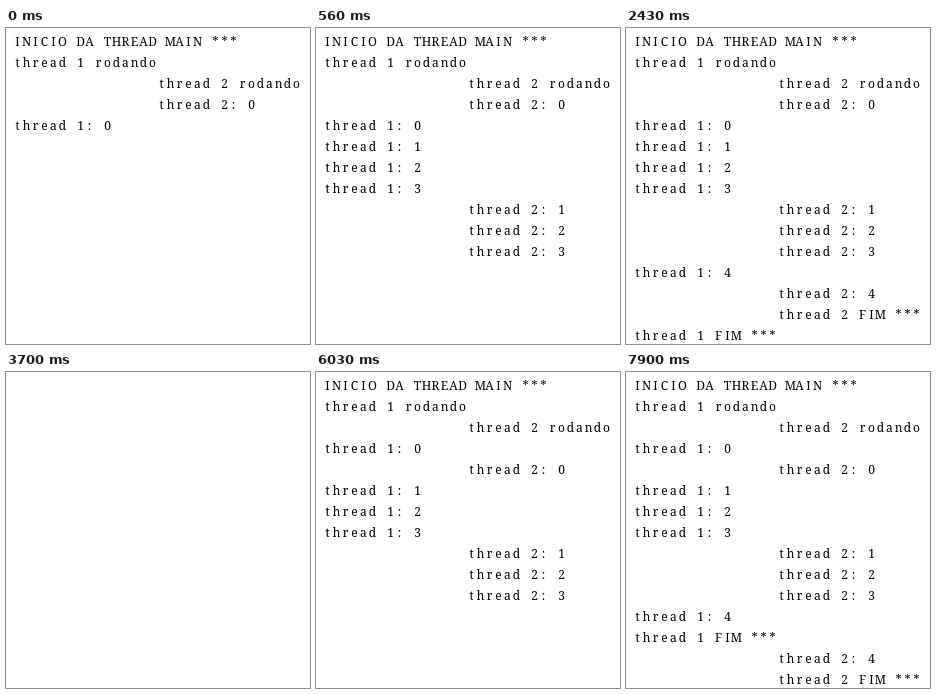
These frames come from a looping animation (304 px wide and 316 px high, 8 s). An HTML page with a canvas:

```html
<!DOCTYPE html>
<html lang="pt">
<head>
<meta charset="utf-8">
<title>Threads</title>
<style>
  html, body { margin: 0; width: 100%; height: 100%; overflow: hidden; background: #fff; }
  canvas { display: block; }
</style>
</head>
<body>
<canvas id="stage" width="304" height="316"></canvas>
<script>
const ctx = document.getElementById('stage').getContext('2d');
const LOOP = 8000;
const LEFT = 7, BASELINE = 18, LINE = 21;
const CELL = 9, INDENT = 16 * CELL;

const intro = ['INICIO DA THREAD MAIN ***', 'thread 1 rodando', 'thread 2 rodando'];
const middle = [
  ...[1, 2, 3].map(n => `thread 1: ${n}`),
  ...[1, 2, 3].map(n => `thread 2: ${n}`),
  'thread 1: 4'
];
const firstRun = [...intro, 'thread 2: 0', 'thread 1: 0', ...middle,
  'thread 2: 4', 'thread 2 FIM ***', 'thread 1 FIM ***'];
const secondRun = [...intro, 'thread 1: 0', 'thread 2: 0', ...middle,
  'thread 1 FIM ***', 'thread 2: 4', 'thread 2 FIM ***'];

const steps = [
  { at: 0, lines: firstRun, count: 5 },
  { at: 500, lines: firstRun, count: 11 },
  { at: 2300, lines: firstRun, count: 15 },
  { at: 3700, lines: [], count: 0 },
  { at: 3900, lines: secondRun, count: 5 },
  { at: 6030, lines: secondRun, count: 11 },
  { at: 7830, lines: secondRun, count: 15 }
];

// Slab letters on a typewriter grid: each one centred in its cell.
function typeLine(text, x, y) {
  [...text].forEach((char, i) => ctx.fillText(char, x + (i + 0.5) * CELL, y));
}

function draw(time) {
  const { lines, count } = steps.findLast(step => step.at <= time);
  ctx.fillStyle = '#fff';
  ctx.fillRect(0, 0, 304, 316);
  ctx.fillStyle = '#000';
  ctx.font = '300 12px "Noto Serif", serif';
  ctx.textAlign = 'center';
  lines.slice(0, count).forEach((text, row) => {
    const x = LEFT + (text.startsWith('thread 2') ? INDENT : 0);
    typeLine(text, x, BASELINE + row * LINE);
  });
}

let start;
function tick(now) {
  start ??= now;
  draw((now - start) % LOOP);
  requestAnimationFrame(tick);
}
draw(0);
requestAnimationFrame(tick);
</script>
</body>
</html>
```
